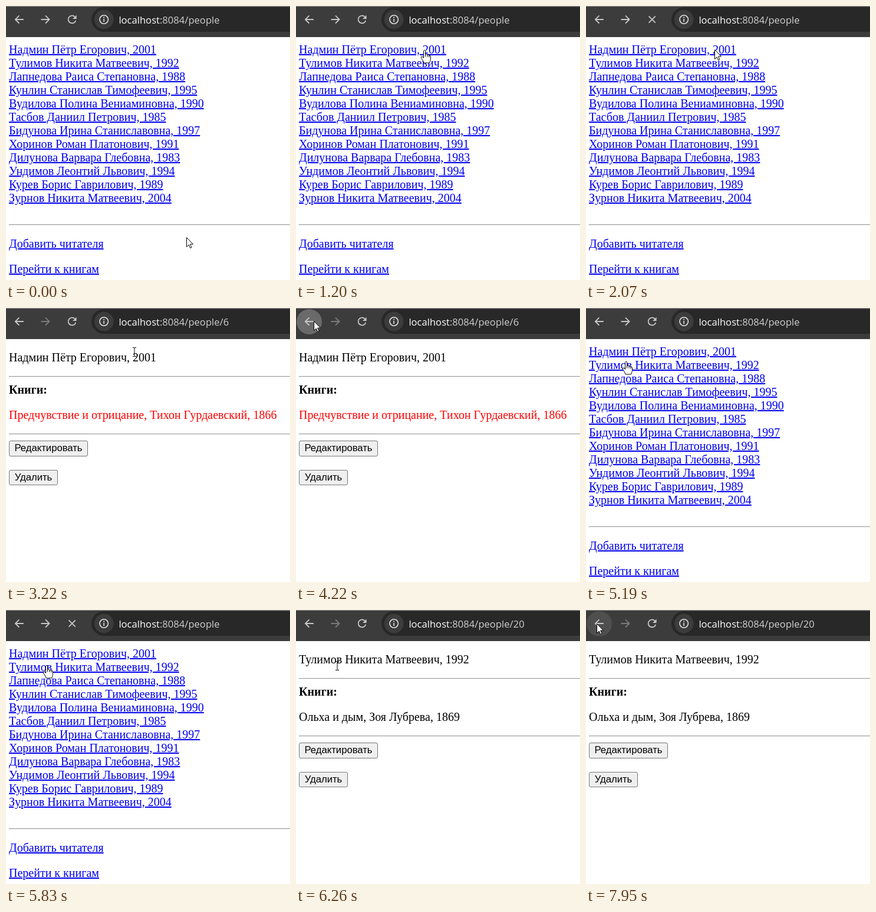
An HTML page that plays this animation: 482x467 px, repeating every 8 s.

```html
<!DOCTYPE html>
<html lang="ru">
<head>
<meta charset="utf-8">
<title>Читатели</title>
<style>
  html, body { margin: 0; width: 100%; height: 100%; overflow: hidden; background: #fff; }
  #stage { position: relative; width: 482px; height: 467px; overflow: hidden;
    font: 20px/23px "Liberation Serif", "Times New Roman", serif; color: #000; white-space: nowrap; }
  #stage > svg { position: absolute; left: 0; top: 0; }
  .page > * { position: absolute; left: 5px; margin: 0; }
  .link { color: #00e; text-decoration: underline; }
  .active { color: #f00; }
  .rule { width: 490px; border: 1px solid; border-color: #9a9a9a #eee #eee #9a9a9a; }
  .button { box-sizing: border-box; border: 1px solid #767676; border-radius: 3px; background: #efefef;
    font: 16.67px "Liberation Sans", Arial, sans-serif; text-align: center; }
  .icon { fill: none; stroke: #c7c7c7; stroke-width: 2; }
  .url { font: 16.6px "Open Sans", "Noto Sans", sans-serif; fill: #d0d0d0; }
</style>
</head>
<body>
<div id="stage">
  <div class="page" id="list"></div>
  <div class="page" id="person"></div>
  <svg width="482" height="467">
    <rect width="482" height="53" fill="#3c3c3c"/>
    <rect width="482" height="1" fill="#909090"/>
    <rect x="145" y="2" width="400" height="42" rx="21" fill="#282828"/>
    <circle id="halo"/>
    <g class="icon">
      <path transform="translate(11.2 11.8) scale(.93)" d="M20 12H5M12 5l-7 7 7 7"/>
      <path id="forward" transform="translate(55.8 11.8) scale(.93)" d="M4 12h15M12 5l7 7-7 7"/>
      <g id="reload" transform="translate(101 11.8) scale(.93)">
        <path d="M18.7 14A7 7 0 1 1 17 7"/>
        <path d="M13 11h7V4z" fill="#c7c7c7" stroke="none"/>
      </g>
      <path id="stop" transform="translate(101 11.8) scale(.93)" d="M6 6l12 12M18 6 6 18"/>
    </g>
    <circle cx="166.2" cy="23" r="16.4" fill="#3c3c3c"/>
    <g fill="none" stroke="#e3e3e3" stroke-width="1.6">
      <circle cx="166.2" cy="23" r="7.2"/>
      <path d="M166.2 22v5M166.2 18.6v1.8"/>
    </g>
    <text class="url" x="191.4" y="30"><tspan fill="#fff">localhost</tspan><tspan id="path"></tspan></text>
    <g id="cursor">
      <path id="arrow" fill="#fff" stroke="#000" d="M.5.5V16.5L4.2 13 6.7 18.5 9 17.5 6.6 12H11.5Z"/>
      <g id="hand" stroke="#000" stroke-linejoin="round" transform="translate(0 -.5)">
        <path fill="#fff" d="M-1.5 14V2Q0-1 1.5 2V8Q3.5 6.5 5 9Q7 7.5 8 10Q10 9 10.5 11.5V16Q10 19 8.5 22.5H-1Q-2 19-5.5 14Q-6 11-3.5 11.5Z"/>
        <path fill="none" d="M1.5 8v4M5 9v3.5M8 10v3"/>
      </g>
      <path id="beam" fill="none" stroke="#000" d="M-3-7.5h2.500l.5.5.5-.5H3M0-7V7M-3 7.5h2.500l.5-.5.5.5H3"/>
    </g>
  </svg>
</div>
<script>
const LOOP = 8000;
const readers = [
  'Надмин Пётр Егорович, 2001',
  'Тулимов Никита Матвеевич, 1992',
  'Лапнедова Раиса Степановна, 1988',
  'Кунлин Станислав Тимофеевич, 1995',
  'Вудилова Полина Вениаминовна, 1990',
  'Тасбов Даниил Петрович, 1985',
  'Бидунова Ирина Станиславовна, 1997',
  'Хоринов Роман Платонович, 1991',
  'Дилунова Варвара Глебовна, 1983',
  'Ундимов Леонтий Львович, 1994',
  'Курев Борис Гаврилович, 1989',
  'Зурнов Никита Матвеевич, 2004'
];
const details = {
  6: { name: readers[0], book: 'Предчувствие и отрицание, Тихон Гурдаевский, 1866', color: '#f00' },
  20: { name: readers[1], book: 'Ольха и дым, Зоя Лубрева, 1869', color: '#000' }
};

// Each track holds [start time, ...values]; values stay until the next entry.
const pages = [
  [0, {}], [1570, { active: 0 }], [1820, { loading: true }], [2190, { id: 6 }],
  [4370, {}], [5710, { active: 1 }], [5830, { loading: true }], [6260, { id: 20 }]
];
const backButton = [
  [0, 'idle'], [3770, 'hover'], [4070, 'ripple'], [4220, 'pressed'],
  [4490, 'hover'], [5060, 'idle'], [7800, 'hover']
];
const pointer = [
  [0, 'arrow', 306, 394], [700, 'arrow', 328, 376], [820, 'arrow', 373, 300],
  [950, 'arrow', 340, 190], [1070, 'hand', 250, 100], [1200, 'hand', 218, 75],
  [2070, 'arrow', 218, 74], [2190, 'beam', 220, 75], [3220, 'beam', 218, 75],
  [3370, 'arrow', 110, 42], [3490, 'arrow', 43, 20], [3640, 'arrow', 33, 19],
  [3770, 'arrow', 30, 19], [3920, 'arrow', 30, 22], [4760, 'arrow', 38, 39],
  [4910, 'arrow', 60, 74], [5060, 'hand', 66, 86], [5180, 'hand', 68, 91],
  [5310, 'hand', 69, 94], [6260, 'beam', 70, 95], [7510, 'arrow', 48, 77],
  [7630, 'arrow', 20, 52], [7800, 'arrow', 13, 34], [7950, 'arrow', 18, 23]
];
const halos = {
  idle: [0, '#3c3c3c'], hover: [21.5, '#4f4f4f'],
  ripple: [21.5, '#525252'], pressed: [21.5, '#6a6a6a']
};

const $ = id => document.getElementById(id);
const at = (track, time) => track.findLast(entry => entry[0] <= time).slice(1);
const show = (id, visible) => { $(id).style.display = visible ? '' : 'none'; };

function add(page, top, className, text = '', size) {
  const el = document.createElement('div');
  el.className = className;
  el.textContent = text;
  el.style.top = top + 'px';
  if (size) {
    [el.style.width, el.style.height] = size.map(n => n + 'px');
    el.style.lineHeight = size[1] - 3 + 'px';
  }
  $(page).append(el);
  return el;
}

const links = readers.map((text, i) => add('list', 63 + 23 * i, 'link', text));
add('list', 372, 'rule');
add('list', 394, 'link', 'Добавить читателя');
add('list', 437, 'link', 'Перейти к книгам');

const personName = add('person', 73, '');
add('person', 116, 'rule');
add('person', 128, '', 'Книги:').style.fontWeight = 'bold';
const personBook = add('person', 171, '');
add('person', 214, 'rule');
add('person', 226, 'button', 'Редактировать', [134, 27]);
add('person', 276, 'button', 'Удалить', [83, 26]);

function draw(time) {
  const [{ id, active, loading }] = at(pages, time);
  show('list', !id);
  show('person', id);
  show('stop', loading);
  show('reload', !loading);
  links.forEach((link, i) => link.classList.toggle('active', i === active));
  $('path').textContent = ':8084/people' + (id ? '/' + id : '');
  $('forward').style.stroke = id ? '#7c7c7c' : '';
  if (id) {
    personName.textContent = details[id].name;
    personBook.textContent = details[id].book;
    personBook.style.color = details[id].color;
  }

  const [r, fill] = halos[at(backButton, time)[0]];
  Object.entries({ cx: 22.5, cy: 23.5, r, fill }).forEach(([key, value]) => $('halo').setAttribute(key, value));

  const [kind, x, y] = at(pointer, time);
  for (const name of ['arrow', 'hand', 'beam']) show(name, name === kind);
  $('cursor').setAttribute('transform', `translate(${x} ${y})`);
}

const start = performance.now();
function tick() {
  draw((performance.now() - start) % LOOP);
  requestAnimationFrame(tick);
}
tick();
</script>
</body>
</html>
```
